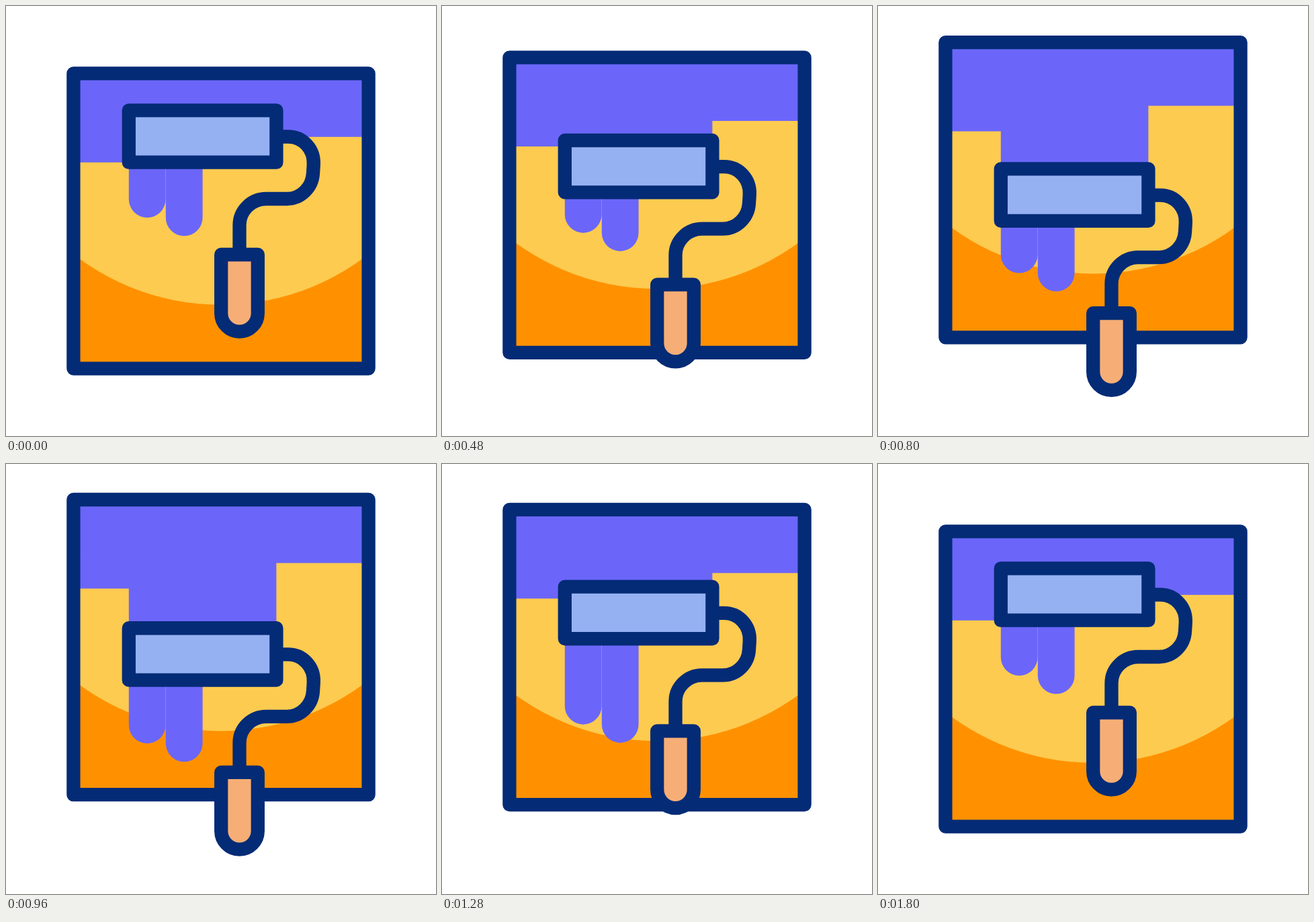
These frames come from a looping animation (640 px wide and 640 px high, 2040 ms). An HTML page with a canvas:

```html
<!DOCTYPE html>
<html lang="en">
<head>
<meta charset="utf-8">
<title>Paint roller</title>
<style>
html, body { margin: 0; width: 100%; height: 100%; overflow: hidden; background: #fff; }
canvas { display: block; width: 640px; height: 640px; }
</style>
</head>
<body>
<canvas id="stage" width="640" height="640"></canvas>
<script>
const ctx = document.getElementById('stage').getContext('2d');
const LOOP = 2040, STEP = 40;
const NAVY = '#042b76', PURPLE = '#6b66f9', YELLOW = '#fdcb50',
      ORANGE = '#ff9100', BLUE = '#95b1f2', PEACH = '#f6ae76';

const arm = new Path2D('M402 194.5H420C442 194.5 459 213 457.8 236L457 249' +
  'C455.8 270 439 287 418 287H387C365 287 347.5 305 347.5 326V370');
const grip = new Path2D('M320.2 370H374.8V457.4A27.3 27.3 0 0 1 320.2 457.4Z');

// Cubic easing with control points (x1, 0) and (x2, 1)
function ease(x, x1 = 0.53, x2 = 0.47) {
  if (x <= 0) return 0;
  if (x >= 1) return 1;
  let lo = 0, hi = 1;
  for (let i = 0; i < 30; i++) {
    const s = (lo + hi) / 2, r = 1 - s;
    if (3 * x1 * s * r * r + 3 * x2 * s * s * r + s * s * s < x) lo = s;
    else hi = s;
  }
  return lo * lo * (3 - 2 * lo);
}

// Rises from 'from' to 'peak', then falls until 'to'
function swing(t, from, peak, to, x1, x2) {
  return t < peak ? ease((t - from) / (peak - from), x1, x2)
                  : 1 - ease((t - peak) / (to - peak));
}

function box(x, y, right, bottom, color) {
  ctx.fillStyle = color;
  ctx.fillRect(x, y, right - x, bottom - y);
}

function drip(x, top, bottom) {
  const r = 27.4;
  ctx.fillStyle = PURPLE;
  ctx.beginPath();
  ctx.moveTo(x, top);
  ctx.lineTo(x + 2 * r, top);
  ctx.arc(x + r, bottom - r, r, 0, Math.PI);
  ctx.closePath();
  ctx.fill();
}

function drawWall(roll, run) {
  box(100, 100, 540, 540, ORANGE);
  ctx.save();
  ctx.beginPath();
  ctx.rect(100, 100, 440, 440);
  ctx.clip();
  ctx.fillStyle = YELLOW;
  ctx.beginPath();
  ctx.arc(320, 88, 356.8, 0, Math.PI * 2);
  ctx.fill();
  ctx.restore();

  const mid = 194 + roll;
  box(100, 100, 540, 194.8, PURPLE);
  box(100, 190, 183, 232.8, PURPLE);
  box(182.8, 190, 402.4, mid, PURPLE);
  drip(182.8, mid, 315 + run);
  drip(237.8, mid, 342.3 + run);
  ctx.strokeRect(100.4, 100.4, 439.2, 439.2);
}

function drawRoller() {
  ctx.stroke(arm);
  ctx.fillStyle = PEACH;
  ctx.fill(grip);
  ctx.stroke(grip);
  box(182.8, 155.3, 402.4, 232.7, BLUE);
  ctx.strokeRect(182.8, 155.3, 219.6, 77.4);
}

function draw(t) {
  const lift = -47.5 * swing(t, 40, 920, 1800);
  // Both are measured against the wall
  const roll = 136.9 * swing(t, 40, 920, 1600);
  const run = 150 * swing(t, 240, 1020, 1670, 0.24, 0.585);

  ctx.setTransform(1, 0, 0, 1, 0, 0);
  box(0, 0, 640, 640, '#fff');
  ctx.strokeStyle = NAVY;
  ctx.lineWidth = 20.3;
  ctx.lineJoin = 'round';
  ctx.translate(0, lift);
  drawWall(roll, run);
  ctx.translate(0, roll);
  drawRoller();
}

const start = performance.now();
function tick() {
  const t = (performance.now() - start) % LOOP;
  draw(Math.floor(t / STEP) * STEP);
  requestAnimationFrame(tick);
}
tick();
</script>
</body>
</html>
```
